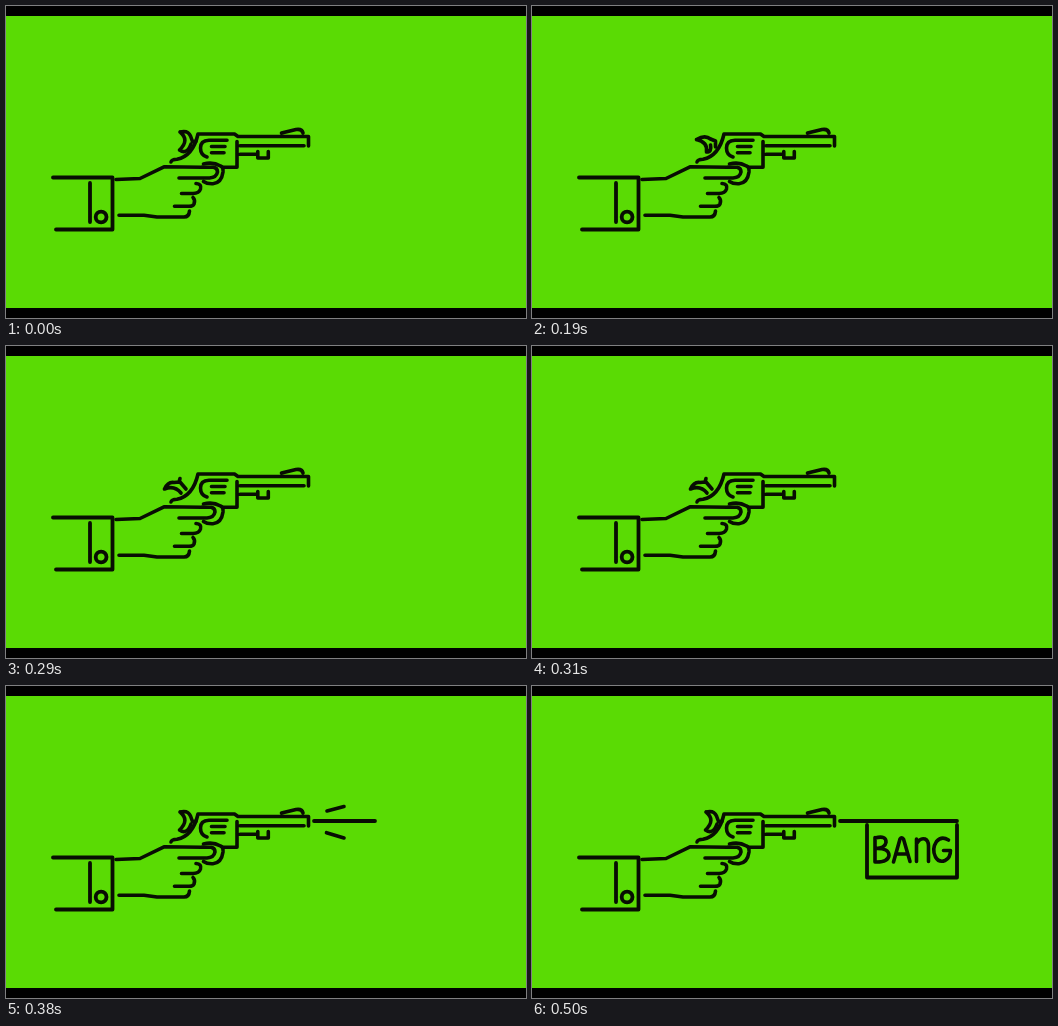
Write an HTML page with a canvas that moves like this. It is 520 px wide and 312 px high and loops after 0.56 s.

```html
<!DOCTYPE html>
<html lang="en">
<head>
<meta charset="utf-8">
<title>Bang</title>
<style>
html, body { margin: 0; width: 100%; height: 100%; overflow: hidden; background: #000; }
canvas { display: block; width: 520px; height: 312px; }
</style>
</head>
<body>
<canvas id="stage" width="520" height="312"></canvas>
<script>
const ctx = document.getElementById('stage').getContext('2d');
const INK = '#080d03';
const GREEN = '#5adb04';
const LOOP = 560;
// Start time of each pose after the first
const STEPS = [190, 250, 310, 380, 440, 500];

const path = d => new Path2D(d);

const sleeve = path('M47 171.5H106.5V223.5H50 M84 177V216 M100.5 211a5.4 5.4 0 1 1-10.8 0a5.4 5.4 0 1 1 10.8 0');

const hand = path(
  'M110 173.5L134 172.5L158 160.8L196 161.3 ' +
  'M190 177.5Q196 178 194.5 183Q193 187.5 187 187.5H175.5 ' +
  'M187 191.5Q189.500 194 188 198Q187 200.3 183 200.3H168.500 ' +
  'M183.500 205Q183 211 178 211H151L138 209.300H113');

const gun = path(
  'M165 156Q165.500 153.500 171 153.300Q187 150 192 128H228.500L232 130.500H302.500V140 ' +
  'M234 139.700H298 M231 135.500V161.300H217 M234 148.300H250 ' +
  'M251.800 145.500V152H262.300V145.500 M275.500 127L290 123.500Q296 122.500 297 127');

const drum = path('M221 134.300H203Q194.500 134.500 194.500 142Q194.500 149 201 151 M205.500 140.500H219 M205.500 146.700H218');

const hammers = [
  'M174 126Q182 124 184.500 130L186.500 135.500H190 M174 126Q184 134 173.500 144Q181 149 185 138',
  'M164.500 133.500Q173 128.500 178.500 133L183.500 135V141 M164.500 133.500Q176 136 174.500 146Q180 146 178.500 139',
  'M158.500 143Q162 135.500 168 136.500L173 136L174 132.500 M174 136L180 143 M158.500 143Q168.500 139 175 147'
].map(path);

const sparksNear = path('M321 125L338 120.500 M320.500 146.700L338 152');
const sparksFar = path('M369.500 112.500L378 110.200 M368 164L378 168.500');
const furled = path('M315.500 141L303.500 162Q336 151 365 147L393 142L397 139.500');
const squiggle = path('M321.500 147Q324 142.500 328 144Q333 147 336 145.500Q339 142 343 142.500Q347 145 350 142.500L358 142');
const banner = path('M335 139V191.500H425V139');
const word = path(
  'M343 151.500V176 M343 152Q354.500 149 354 156.500Q353 162 344 162.500Q357 162 357 169.500Q356 176.500 343 176 ' +
  'M361.500 176L368 153Q369.500 150.500 371.500 153L378 175.500 M364.500 168H375 ' +
  'M384.500 175.500V153 M384.500 158Q388 151.500 393 153Q396.500 154.500 396.500 160V175.500 ' +
  'M416.500 154Q409.500 149.500 404.500 155.500Q399.500 163 403.500 171Q407 177 413 174.500Q418.500 172 418.500 164.500H411.500');

function draw(shape, width = 3.6) {
  ctx.lineWidth = width;
  ctx.stroke(shape);
}

function trigger(pulled) {
  const tip = pulled ? 209 : 211.5;
  draw(path(`M196 161.300H${tip - 4}Q${tip} 162 ${tip} 166Q${tip - 1} 171.500 ${tip - 8} 172H173`));
  draw(path('M197.500 158Q207 155.500 214.500 160Q217.500 161 217 166Q215.500 177 207 177.700Q201 178 197.500 175.500'));
}

function rod(end) {
  draw(path(`M308 135H${end}`), 3.8);
}

function render(time) {
  const t = time % LOOP;
  const pose = STEPS.filter(s => t >= s).length;

  ctx.fillStyle = '#000';
  ctx.fillRect(0, 0, 520, 312);
  ctx.fillStyle = GREEN;
  ctx.fillRect(0, 10, 520, 292);

  ctx.strokeStyle = INK;
  ctx.lineCap = ctx.lineJoin = 'round';
  draw(sleeve, 3.8);
  [hand, gun, drum].forEach(s => draw(s));
  trigger(pose > 0);
  draw(hammers[pose > 3 ? 0 : Math.min(pose, 2)]);

  if (pose === 4) {
    rod(369);
    draw(sparksNear);
  } else if (pose === 5) {
    rod(401);
    [furled, squiggle, sparksFar].forEach(s => draw(s));
  } else if (pose === 6) {
    rod(425);
    draw(banner, 3.8);
    draw(word);
  }
}

const start = performance.now();
function tick() {
  render(performance.now() - start);
  requestAnimationFrame(tick);
}
tick();
</script>
</body>
</html>
```
